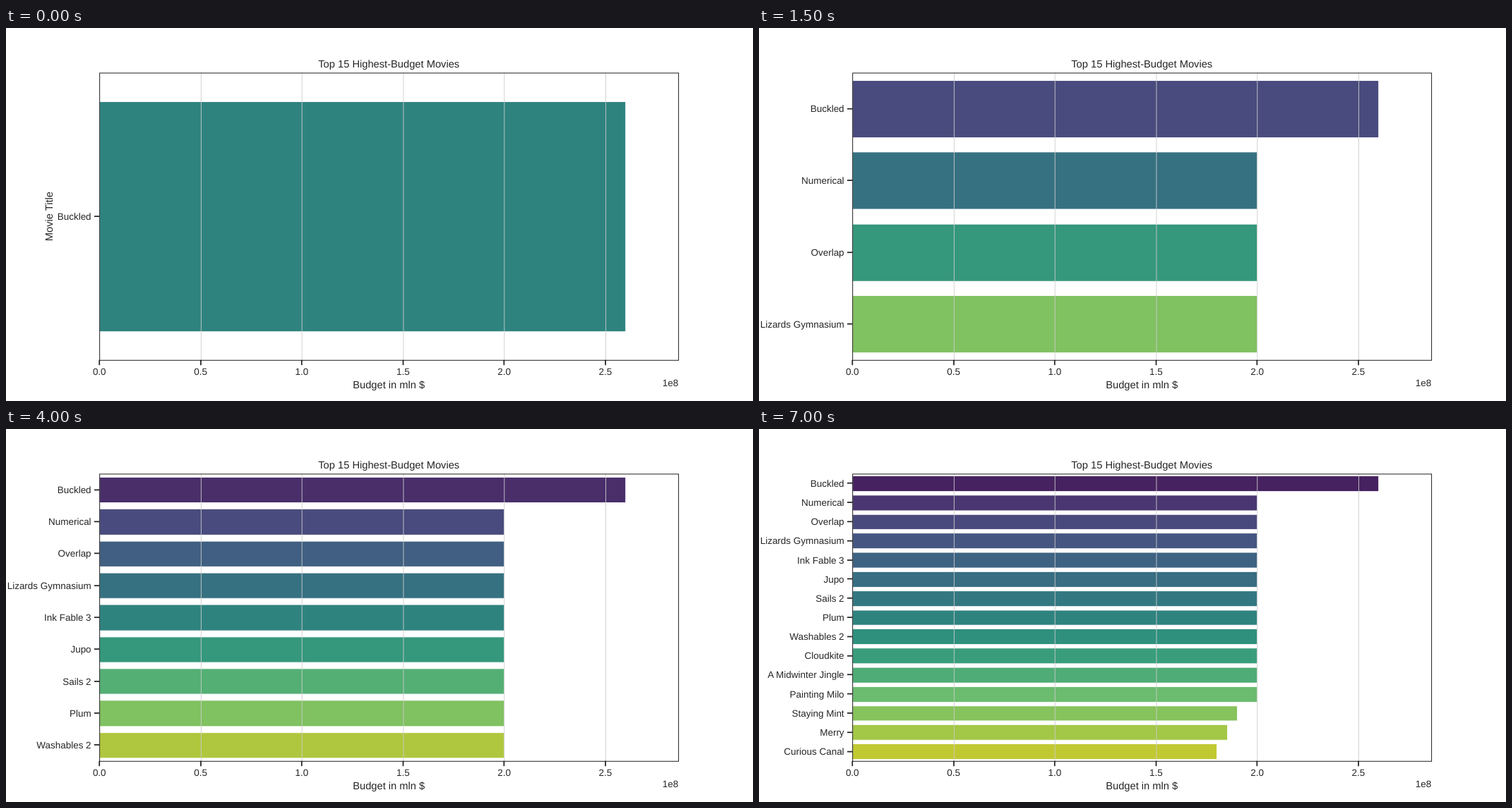
An HTML page for the animation above (7500 ms loop, 1058 by 529 pixels).

```html
<!DOCTYPE html>
<html lang="en">
<head>
<meta charset="utf-8">
<title>Top 15 Highest-Budget Movies</title>
<style>
  html, body { margin: 0; width: 100%; height: 100%; overflow: hidden; background: #fff; }
  svg { display: block; width: 100%; height: 100%; }
  text {
    font-family: "Liberation Sans", Arial, sans-serif;
    font-size: 15.28px;
    fill: #262626;
    text-rendering: geometricPrecision;
  }
  .label { font-size: 16.67px; }
  .mid { text-anchor: middle; }
  .end { text-anchor: end; }
  .bar { stroke: #fff; }
  .grid { stroke: #ccc; }
  .tick { stroke: #262626; stroke-width: 2; }
  .frame { fill: none; stroke: #000; }
</style>
</head>
<body>
<svg viewBox="0 0 1200 600">
  <g id="bars"></g>
  <g id="axis"></g>
  <rect class="frame" x="150.5" y="72.5" width="930" height="462"/>
  <text class="label mid" x="615" y="64">Top 15 Highest-Budget Movies</text>
  <text class="label mid" x="615" y="580">Budget in mln $</text>
  <text class="end" x="1080" y="576">1e8</text>
</svg>
<script>
const STEP = 500;
const LEFT = 150, TOP = 72, WIDTH = 930, HEIGHT = 462;
const BOTTOM = TOP + HEIGHT;
const MAX_BUDGET = 286;

const movies = [
  ["Buckled", 260], ["Numerical", 200], ["Overlap", 200],
  ["Lizards Gymnasium", 200], ["Ink Fable 3", 200], ["Jupo", 200],
  ["Sails 2", 200], ["Plum", 200], ["Washables 2", 200],
  ["Cloudkite", 200], ["A Midwinter Jingle", 200], ["Painting Milo", 200],
  ["Staying Mint", 190], ["Merry", 185], ["Curious Canal", 180]
];

// Viridis stops, one every 16 of 256 levels
const viridis = [
  0x440154, 0x48186a, 0x472d7b, 0x424086, 0x3b528b, 0x33638d,
  0x2c728e, 0x26828e, 0x21918c, 0x1fa088, 0x28ae80, 0x3fbc73,
  0x5ec962, 0x84d44b, 0xaddc30, 0xd8e219, 0xfde725
].map(hex => [hex >> 16, hex >> 8 & 255, hex & 255]);

function barColor(fraction) {
  const pos = Math.floor(fraction * 256) / 16;
  const i = Math.floor(pos);
  const rgb = viridis[i].map((c, k) => c + (viridis[i + 1][k] - c) * (pos - i));
  const light = (Math.max(...rgb) + Math.min(...rgb)) / 2;
  const muted = rgb.map(c => Math.round(light + (c - light) * 0.75));
  return `rgb(${muted})`;
}

const xOf = budget => Math.round(LEFT + WIDTH * budget / MAX_BUDGET);
const line = (cls, x1, y1, x2, y2) =>
  `<line class="${cls}" x1="${x1}" y1="${y1}" x2="${x2}" y2="${y2}"/>`;
const text = (cls, x, y, str, extra = "") =>
  `<text class="${cls}" x="${x}" y="${y}" ${extra}>${str}</text>`;

function axisMarkup() {
  let out = "";
  for (let k = 0; k < 6; k++) {
    const x = xOf(k * 50);
    if (k) out += line("grid", x + 0.5, TOP, x + 0.5, BOTTOM);
    out += line("tick", x, BOTTOM, x, BOTTOM + 8.3);
    out += text("mid", LEFT + WIDTH * k * 50 / MAX_BUDGET, 558.3, (k / 2).toFixed(1));
  }
  return out;
}

function barsMarkup(count) {
  const row = HEIGHT / count;
  let out = "";
  movies.slice(0, count).forEach(([name, budget], i) => {
    const top = Math.round(TOP + row * (i + 0.1));
    const bottom = Math.round(TOP + row * (i + 0.9));
    const mid = TOP + row * (i + 0.5);
    const tickY = Math.round(mid);
    out += `<rect class="bar" x="${LEFT + 0.5}" y="${top + 0.5}" width="${xOf(budget) - LEFT}"
      height="${bottom - top}" fill="${barColor((i + 1) / (count + 1))}"/>`;
    out += line("tick", LEFT - 8.3, tickY, LEFT, tickY);
    out += text("end", 136.8, mid + 5.5, name);
  });
  // The axis title is pushed out of view once the longest name appears
  if (count < 4) {
    const x = count === 1 ? 74.6 : 59.9;
    out += text("label mid", 0, 0, "Movie Title", `transform="translate(${x} 303) rotate(-90)"`);
  }
  return out;
}

const bars = document.getElementById("bars");
document.getElementById("axis").innerHTML = axisMarkup();

let shown = 0;
function draw() {
  const count = Math.floor(performance.now() / STEP) % movies.length + 1;
  if (count !== shown) {
    bars.innerHTML = barsMarkup(count);
    shown = count;
  }
  requestAnimationFrame(draw);
}
draw();
</script>
</body>
</html>
```
